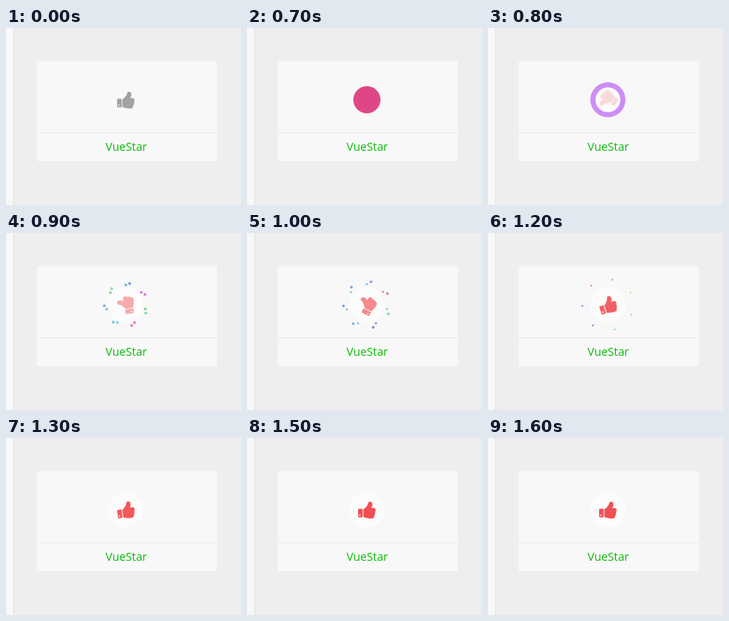
Animation, 294 px wide and 222 px high, one loop 1900 ms. Source, as an HTML page with a canvas:

```html
<!DOCTYPE html>
<html lang="en">
<head>
<meta charset="utf-8">
<title>VueStar</title>
<style>
  html, body { margin: 0; width: 100%; height: 100%; overflow: hidden; background: #eee; }
  canvas { display: block; }
</style>
</head>
<body>
<canvas id="stage" width="294" height="222"></canvas>
<script>
const ctx = document.getElementById('stage').getContext('2d');
const LOOP = 1900, STEP = 100, CX = 150, CY = 90, TAU = Math.PI * 2;

// Thumb icon, 22 x 21 px, with a round hole in the cuff
const thumb = new Path2D(
  'M1 8.8H4.8Q5.7 8.8 5.7 9.7V18.5Q5.7 19.4 4.8 19.4H1Q0 19.4 0 18.5V9.7Q0 8.8 1 8.8Z' +
  'M1.3 16.8a.9.9 0 1 0 1.8 0a.9.9 0 1 0-1.8 0Z' +
  'M6.6 9.7Q6.6 8.9 7.5 8.8C8.5 8.7 10 6.3 11.3 4.8C12.7 3.6 12.2 0 14.3 0' +
  'C17.6 0 17.9 2 17.9 3.5C17.9 5.5 17 6.4 16.5 7.9H19.4C21.5 7.9 22 9.5 22 10.6' +
  'Q22 11.8 21.2 12.6Q21.8 14 20.9 15.5Q21.2 17 19.9 18.1C20 20.5 18.6 21.1 16.5 21.1' +
  'H15C12 21.1 9 19.6 7.4 19.5Q6.6 19.4 6.6 18.6Z');

// Each pair of sparks drifts from its first hue to its second
const hues = [[310, 402], [145, 160], [320, 207], [190, 225], [205, 228], [150, 285], [220, 215]];

const lerp = (a, b, p) => a + (b - a) * p;

function rect(color, x, y, w, h) {
  ctx.fillStyle = color;
  ctx.fillRect(x, y, w, h);
}

function disc(color, x, y, r) {
  ctx.fillStyle = color;
  ctx.beginPath();
  ctx.arc(x, y, Math.max(r, 0), 0, TAU);
  ctx.fill();
}

function drawCard() {
  rect('#eee', 0, 0, 294, 222);
  rect('#f8f8f8', 0, 0, 9, 222);
  rect('#e3e3e3', 9, 0, 1, 222);
  ctx.fillStyle = '#f8f8f8';
  ctx.beginPath();
  ctx.roundRect(38.5, 41.5, 225.5, 125.5, 1.5);
  ctx.fill();
  rect('#ececec', 39, 131, 225, 1);
  ctx.fillStyle = '#09bb07';
  ctx.font = '14.3px "Open Sans", "Noto Sans", sans-serif';
  ctx.textAlign = 'center';
  ctx.fillText('VueStar', 150.5, 154);
}

function drawThumb(color, angle, alpha) {
  ctx.save();
  ctx.translate(CX, CY + 0.5);
  ctx.rotate(angle * Math.PI / 180);
  ctx.translate(-11, -10.5);
  ctx.globalAlpha = alpha;
  ctx.fillStyle = color;
  ctx.fill(thumb, 'evenodd');
  ctx.restore();
}

function drawSparks(t) {
  const p = (t - 900) / 200;
  const spread = 1 - (1 - p / 2) ** 2;
  const spark = (angle, dist, size, color) =>
    disc(color, CX + Math.cos(angle) * dist, CY + Math.sin(angle) * dist, size);
  hues.forEach(([from, to], i) => {
    const angle = (-28.5 / 360 + i / 7) * TAU;
    const hue = lerp(from, to, p);
    spark(angle, 27 + 5.3 * spread, lerp(1.8, 1.5, p * p), `hsl(${hue} 58% 68%)`);
    spark(angle - 0.18, 24.7 + 2.4 * spread, lerp(1.8, 0.8, p), `hsl(${hue - 15} 50% 68%)`);
  });
}

function draw(now) {
  const t = Math.floor(now % LOOP / STEP) * STEP;
  drawCard();
  if (t < 700) {
    drawThumb('#a2a2a2', 0, 1);
  } else if (t < 800) {
    disc('#df4688', CX, CY, 17);
  } else {
    const left = Math.max(0, (1600 - t) / 800) ** 3;
    disc(t < 900 ? '#cc8ef5' : '#fcfcfc', CX, CY, 22);
    if (t < 900) disc('#fcfcfc', CX, CY, 15.5);
    drawThumb('#f05053', -145 * left, 1 - 0.8 * left);
    if (t >= 900 && t < 1300) drawSparks(t);
  }
}

const start = performance.now();
function tick() {
  draw(performance.now() - start);
  requestAnimationFrame(tick);
}
tick();
</script>
</body>
</html>
```
